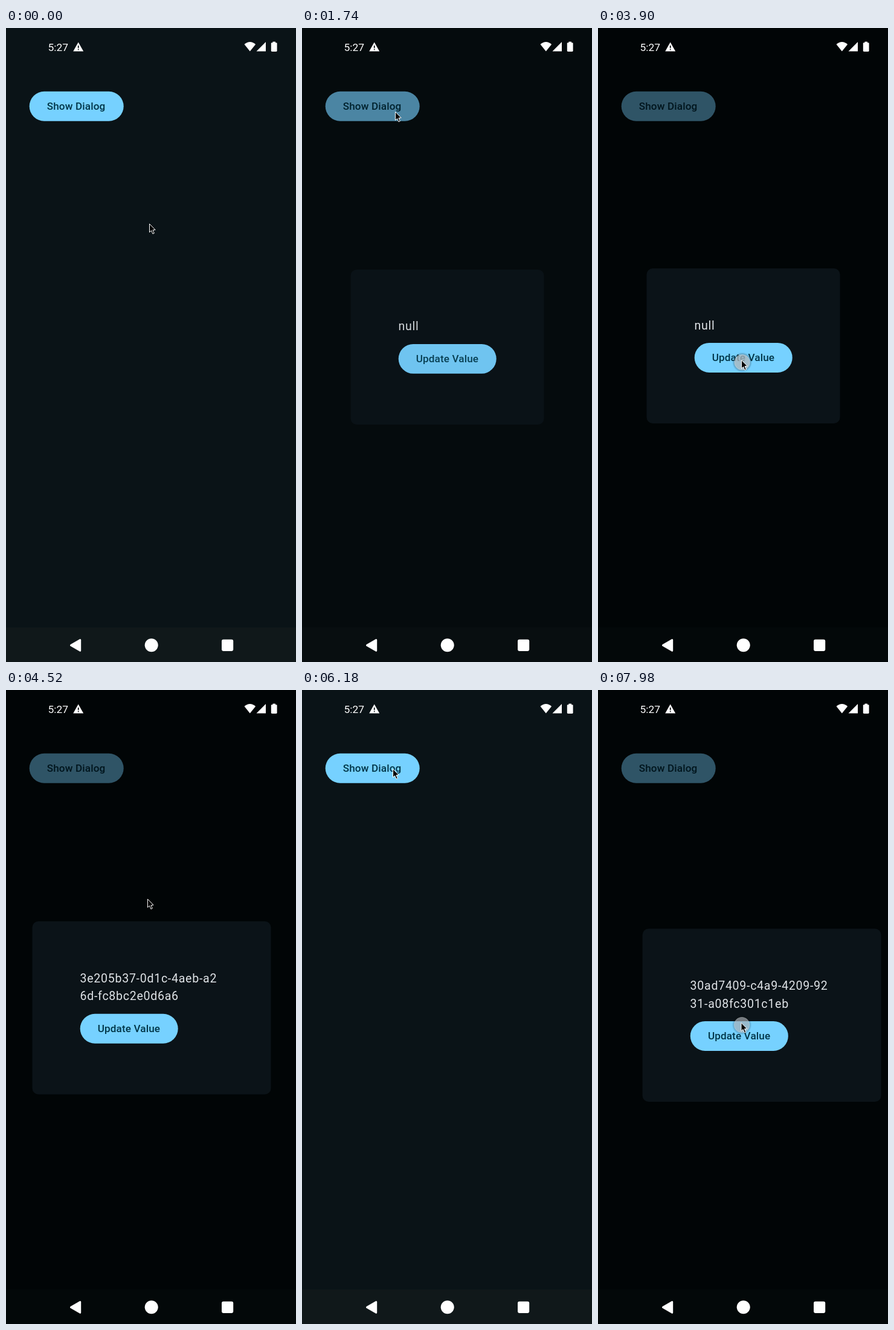
These frames come from a looping animation (480 px wide and 1047 px high, 8 s). An HTML page with a canvas:

```html
<!DOCTYPE html>
<html lang="en">
<head>
<meta charset="utf-8">
<title>Dialog demo</title>
<style>
  html, body { margin: 0; width: 100%; height: 100%; overflow: hidden; background: #0a1317; }
  canvas { display: block; width: 480px; height: 1047px; }
</style>
</head>
<body>
<canvas id="stage" width="480" height="1047"></canvas>
<script>
const ctx = document.getElementById('stage').getContext('2d');
const W = 480, H = 1047, LOOP = 8000;
const PRIMARY = [118, 209, 255], ON_PRIMARY = [0, 53, 72];
const LABEL = '500 17.11px Roboto, sans-serif';
const BODY = '400 19.56px Roboto, sans-serif';

const clamp = v => Math.min(1, Math.max(0, v));
const span = (t, from, to) => clamp((t - from) / (to - from));
const mix = (a, b, u) => a + (b - a) * u;
const smooth = u => u * u * (3 - 2 * u);
const outCubic = u => 1 - (1 - u) ** 3;
const sineInOut = u => (1 - Math.cos(Math.PI * u)) / 2;
const blend = (a, b, u) => `rgb(${a.map((v, i) => mix(v, b[i], u)).join()})`;
const shade = (c, dim) => blend(c, [0, 0, 0], dim);

// Pointer travel: start, end, target x, target y, easing
const START = [237, 323];
const MOVES = [
  [660, 1300, 154, 138, smooth],
  [2140, 3200, 237, 548, smooth],
  [4140, 4520, 234, 345, smooth],
  [4520, 4720, 230, 331, outCubic],
  [5440, 6080, 150, 130, smooth],
  [7020, 7660, 236.5, 549, smooth]
];

// Touch indicator: down, up
const TOUCHES = [[1500, 1540], [3840, 3930], [5080, 5160], [6420, 6560], [7820, 7950]];
const FADE = 200;

// Each dialog session: opens, value changes, closes (the last one outlives the loop)
const SESSIONS = [
  { open: 1572, update: 3910, close: 5170, value: ['3e205b37-0d1c-4aeb-a2', '6d-fc8bc2e0d6a6'] },
  { open: 6555, update: 7900, close: LOOP, value: ['30ad7409-c4a9-4209-92', '31-a08fc301c1eb'] }
];

function pointerAt(t) {
  let [x, y] = START;
  for (const [from, to, tx, ty, ease] of MOVES) {
    const u = ease(span(t, from, to));
    x = mix(x, tx, u);
    y = mix(y, ty, u);
  }
  return [x, y];
}

function roundRect(x, y, w, h, r, fill) {
  ctx.fillStyle = fill;
  ctx.beginPath();
  ctx.roundRect(x, y, w, h, r);
  ctx.fill();
}

function polygon(points, fill) {
  ctx.beginPath();
  points.forEach(([x, y]) => ctx.lineTo(x, y));
  ctx.closePath();
  ctx.fillStyle = fill;
  ctx.fill();
}

function text(str, x, y, font, fill, spacing) {
  ctx.font = font;
  ctx.letterSpacing = spacing + 'px';
  ctx.fillStyle = fill;
  ctx.fillText(str, x, y);
}

function button(label, x, y, w, dim) {
  roundRect(x, y, w, 48.9, 24.45, shade(PRIMARY, dim));
  text(label, x + 29.1, y + 30.4, LABEL, shade(ON_PRIMARY, dim), 0.12);
}

function statusBar(dark) {
  text('5:27', 69.4, 38, '400 17.4px Roboto, sans-serif', '#fff', 0);
  polygon([[119.7, 23.5], [128.2, 38.5], [111.2, 38.5]], '#fff');
  ctx.fillStyle = dark;
  ctx.fillRect(118.9, 29, 1.7, 4.2);
  ctx.fillRect(118.9, 34.6, 1.7, 1.7);

  ctx.fillStyle = '#fff';
  ctx.beginPath();
  ctx.moveTo(403.8, 38.6);
  ctx.lineTo(394.5, 27);
  ctx.quadraticCurveTo(403.8, 19.2, 413.1, 27);
  ctx.fill();
  polygon([[430, 23], [430, 38.5], [414.5, 38.5]], '#fff');
  roundRect(438.8, 24.2, 9.8, 14.8, 1.4, '#fff');
  ctx.fillRect(441.4, 22.6, 4.6, 2.4);
}

function navBar(dim) {
  ctx.fillStyle = blend([16, 24, 26], [3, 8, 9], dim);
  ctx.fillRect(0, 990, W, H - 990);
  ctx.strokeStyle = '#fff';
  ctx.lineWidth = 3;
  ctx.lineJoin = 'round';
  polygon([[107.5, 1019.4], [122.7, 1010.6], [122.7, 1028.2]], '#fff');
  ctx.stroke();
  roundRect(229.7, 1008.2, 22, 22, 11, '#fff');
  roundRect(357, 1009.7, 19.2, 19.2, 2.8, '#fff');
}

function dialog(session, t) {
  const enter = span(t, session.open, session.open + 280);
  const exit = span(t, session.close, session.close + 180);
  const updated = t >= session.update;
  const lines = updated ? session.value : ['null'];
  const shift = sineInOut(span(t, session.update + 10, session.update + 260));
  const x = mix(80.5, 43.5, shift);
  const y = mix(397, 382, shift) + 12 * (1 - enter) ** 2 + 8 * exit * exit;
  const extra = (lines.length - 1) * 29.8;

  ctx.save();
  ctx.globalAlpha = outCubic(enter) * (1 - exit);
  roundRect(x, y, updated ? 395 : 320, 256 + extra, 10, '#0b1318');
  lines.forEach((line, i) =>
    text(line, x + 79, y + 100.5 + i * 29.8, BODY, '#dfe3e7', 0.73));
  button('Update Value', x + 79.2, y + 123 + extra, 162, 0);
  ctx.restore();
}

function touch(t, x, y) {
  const hit = TOUCHES.find(([down, up]) => t >= down && t < up + FADE);
  if (!hit) return;
  ctx.save();
  ctx.translate(x + 1.6, y + 4);
  ctx.globalAlpha = 1 - span(t, hit[1], hit[1] + FADE);
  const halo = ctx.createRadialGradient(0, 0, 12, 0, 0, 16.5);
  halo.addColorStop(0, 'rgba(0,0,0,.3)');
  halo.addColorStop(1, 'rgba(0,0,0,0)');
  roundRect(-16.5, -16.5, 33, 33, 16.5, halo);
  roundRect(-12.5, -12.5, 25, 25, 12.5, 'rgba(205,212,216,.65)');
  ctx.strokeStyle = 'rgba(235,240,242,.4)';
  ctx.lineWidth = 1.2;
  ctx.stroke();
  ctx.restore();
}

function pointer(x, y) {
  ctx.save();
  ctx.translate(x + 0.5, y + 0.5);
  polygon([[0, 0], [0, 13.8], [3.1, 11], [5.4, 16.4], [7.8, 15.4], [5.5, 10.2], [9.6, 9.8]], '#000');
  ctx.strokeStyle = '#fff';
  ctx.lineWidth = 1;
  ctx.lineJoin = 'miter';
  ctx.stroke();
  ctx.restore();
}

function draw(t) {
  const session = SESSIONS.find(s => t >= s.open && t < s.close + 220);
  const dim = session
    ? span(t, session.open, session.open + 280) * (1 - span(t, session.close, session.close + 220))
    : 0;
  const background = blend([10, 19, 23], [1, 5, 6], dim);
  ctx.fillStyle = background;
  ctx.fillRect(0, 0, W, H);
  button('Show Dialog', 38.7, 104.8, 156, dim * 0.6);
  navBar(dim);
  statusBar(background);
  if (session) dialog(session, t);
  const [x, y] = pointerAt(t);
  touch(t, x, y);
  pointer(x, y);
}

const began = performance.now();
function tick() {
  draw((performance.now() - began) % LOOP);
  requestAnimationFrame(tick);
}
tick();
</script>
</body>
</html>
```
